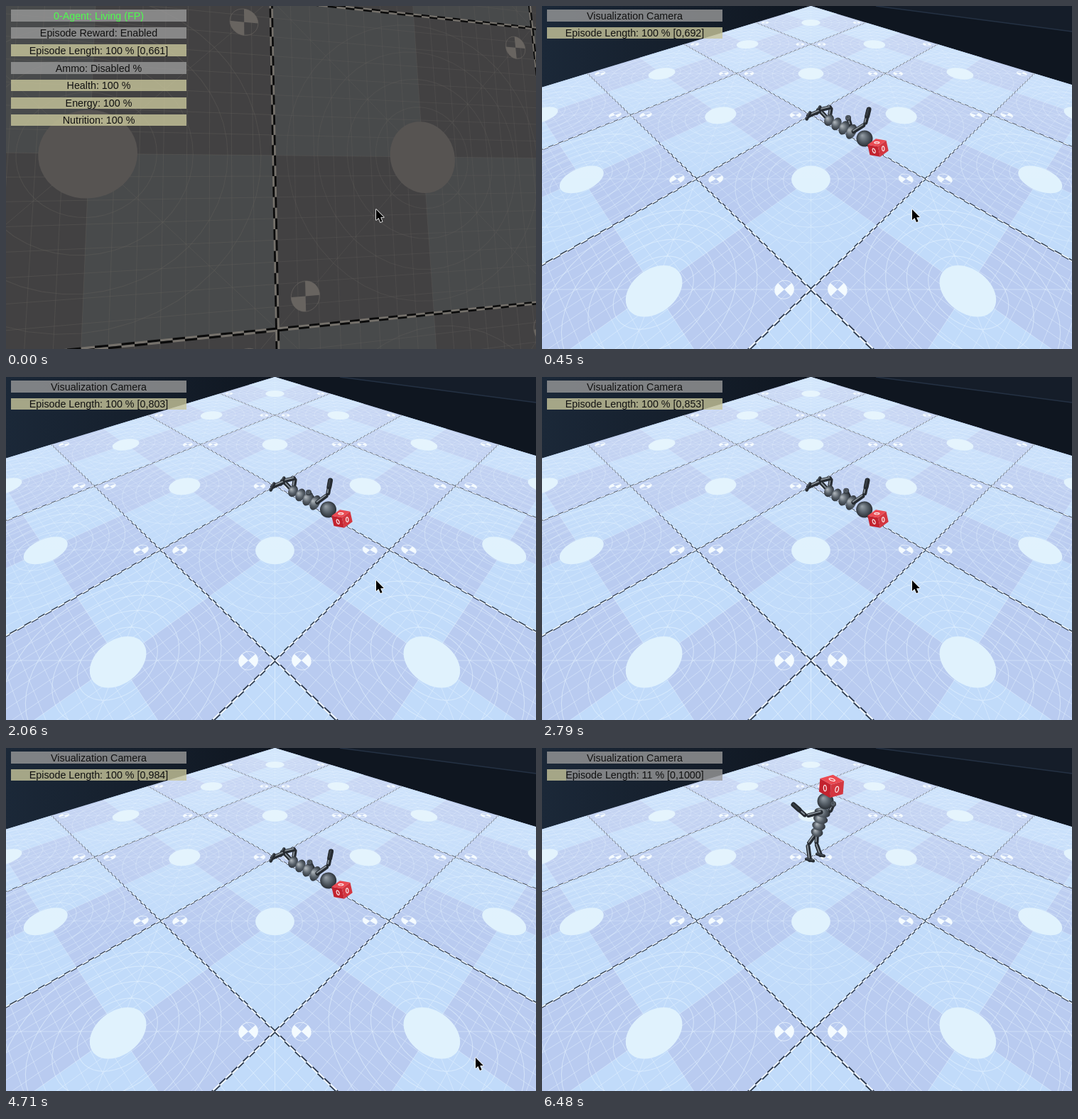
Recreate the animation shown at these times as an HTML page with a canvas. Size 746x484 px, loop 6580 ms.

```html
<!DOCTYPE html>
<html lang="en">
<head>
<meta charset="utf-8">
<title>Floor camera</title>
<style>
html, body { margin: 0; width: 100%; height: 100%; overflow: hidden; background: #0e131b; }
canvas { display: block; }
</style>
</head>
<body>
<canvas id="stage" width="746" height="484"></canvas>
<script>
const W = 746, H = 484, LOOP = 6580, STEP = 147.1;
const CUT = 3, CURSOR_GO = 28, RESET = 34;
const stage = document.getElementById('stage').getContext('2d');

const lerp = (a, b, k) => a + (b - a) * k;
const add = (p, d, k = 1) => [p[0] + d[0] * k, p[1] + d[1] * k];
const sub = (p, q) => [p[0] - q[0], p[1] - q[1]];
const mix = (p, q, k) => add(p, sub(q, p), k);
const perp = d => [-d[1], d[0]];

// Floor cameras: tile coordinates (u, v) to [x, y, depth]
function wideCam(u, v) {
  const s = u + v, w = 1 + 0.366 * s;
  return [378.5 + 220 * (v - u) / w, (400 - 66.7 * s) / w, w];
}
function agentCam(u, v) {
  const w = 1 + 0.202 * u - 0.103 * v;
  return [(373 + 517 * u - 30.4 * v) / w, (-9.5 + 47 * u + 419 * v) / w, w];
}

const wideLook = {
  light: '#c1dbfa', dark: '#b9cbf0', line: '#e6f4ff', fine: 0.45, ring: 0.55,
  emblem: '#e0f2fd', mark: '#f4fbff', seam: '#2b3646', check: '#f4faff', seamW: 1.5
};
const agentLook = {
  light: '#484a4b', dark: '#424142', line: '#67635f', fine: 0.3, ring: 0.3,
  emblem: '#575452', mark: '#686460', seam: '#0b0b0b', check: '#75716b', seamW: 2.6
};

function layer(draw) {
  const c = document.createElement('canvas');
  c.width = W;
  c.height = H;
  draw(c.getContext('2d'));
  return c;
}

function trace(g, pts, close = true) {
  g.beginPath();
  pts.forEach(p => g.lineTo(p[0], p[1]));
  if (close) g.closePath();
}

function fillPoly(g, pts, color) {
  g.fillStyle = color;
  trace(g, pts);
  g.fill();
}

function stroke(g, pts, color, width, alpha = 1) {
  g.globalAlpha = alpha;
  g.strokeStyle = color;
  g.lineWidth = width;
  trace(g, pts, false);
  g.stroke();
  g.globalAlpha = 1;
}

function fade(g, x, y, from, to) {
  const grad = g.createLinearGradient(0, 0, x, y);
  grad.addColorStop(0, from);
  grad.addColorStop(1, to);
  return grad;
}

function arcPoints(cam, u, v, r, from = 0, to = 2 * Math.PI) {
  return Array.from({ length: 49 }, (_, k) => {
    const a = lerp(from, to, k / 48);
    return cam(u + r * Math.cos(a), v + r * Math.sin(a));
  });
}

function drawTile(g, cam, look, i, j) {
  const rect = (u, v, s) => [cam(u, v), cam(u + s, v), cam(u + s, v + s), cam(u, v + s)];
  const depth = Math.max(0.7, cam(i + 0.5, j + 0.5)[2]);
  fillPoly(g, rect(i, j, 1), look.dark);
  fillPoly(g, rect(i, j, 0.5), look.light);
  fillPoly(g, rect(i + 0.5, j + 0.5, 0.5), look.light);

  const fine = look.fine / depth;
  for (let t = 1 / 16; t < 1; t += 1 / 16) {
    stroke(g, [cam(i + t, j), cam(i + t, j + 1)], look.line, 1, fine);
    stroke(g, [cam(i, j + t), cam(i + 1, j + t)], look.line, 1, fine);
  }
  stroke(g, [cam(i, j), cam(i + 1, j + 1)], look.line, 1, fine);
  stroke(g, [cam(i + 1, j), cam(i, j + 1)], look.line, 1, fine);
  for (let r = 0.17; r < 0.5; r += 0.097)
    stroke(g, arcPoints(cam, i + 0.5, j + 0.5, r), look.line, 1.1, look.ring / depth);
  fillPoly(g, arcPoints(cam, i + 0.5, j + 0.5, 0.12), look.emblem);
}

function drawMarker(g, cam, look, u, v) {
  for (const a of [Math.PI / 2, Math.PI * 1.5])
    fillPoly(g, [cam(u, v), ...arcPoints(cam, u, v, 0.043, a, a + Math.PI / 2)], look.mark);
  stroke(g, arcPoints(cam, u, v, 0.043), look.mark, 1, 0.7);
}

// Two rows of alternating checks along a tile edge
function drawSeam(g, cam, look, u, v, du, dv) {
  for (let k = 0; k < 32; k++)
    for (const side of [-1, 1]) {
      const at = t => cam(u + du * t / 32 + dv * side * 0.003, v + dv * t / 32 + du * side * 0.003);
      const p = at(k), color = (k % 2 ? side : -side) > 0 ? look.check : look.seam;
      stroke(g, [p, at(k + 1)], color, look.seamW / Math.max(0.7, p[2]));
    }
}

function drawFloor(g, cam, look, from, to, keep = () => true) {
  const cells = [];
  for (let i = from; i <= to; i++)
    for (let j = from; j <= to; j++)
      if (keep(i, j)) cells.push([i, j]);
  for (const [i, j] of cells) drawTile(g, cam, look, i, j);
  for (const [i, j] of cells) {
    drawSeam(g, cam, look, i, j, 1, 0);
    drawSeam(g, cam, look, i, j, 0, 1);
    drawMarker(g, cam, look, i + 0.085, j + 0.915);
    drawMarker(g, cam, look, i + 0.915, j + 0.085);
  }
}

const wideView = layer(g => {
  g.fillStyle = fade(g, 378, 0, '#1b2838', '#0f1620');
  g.fillRect(0, 0, W, H);
  fillPoly(g, [[470, 0], [W, 0], [W, 36]], '#151d29');
  stroke(g, [[470, 0], [W, 36]], '#243143', 1.5);
  drawFloor(g, wideCam, wideLook, -7, 2, (i, j) => i + j >= -2);
  const sheen = fade(g, 0, 260, 'rgba(255,255,255,.25)', 'rgba(255,255,255,0)');
  fillPoly(g, [wideCam(3, 3), wideCam(3, -3), wideCam(-3, 3)], sheen);
});
const agentView = layer(g => drawFloor(g, agentCam, agentLook, -1, 1));

function limb(a, b, width = 6, tone = '#8a939b') {
  stage.lineCap = 'round';
  stroke(stage, [a, b], '#262b31', width);
  stroke(stage, [add(a, [-0.8, -1]), add(b, [-0.8, -1])], tone, width * 0.3);
  stage.lineCap = 'butt';
}

function ball([x, y], rx, ry = rx, turn = 0, tone = '#b4bbc1') {
  const shade = stage.createRadialGradient(x - rx * 0.3, y - ry * 0.4, 0, x, y, rx * 1.1);
  shade.addColorStop(0, tone);
  shade.addColorStop(0.5, '#59626b');
  shade.addColorStop(1, '#22272d');
  stage.fillStyle = shade;
  stage.beginPath();
  stage.ellipse(x, y, rx, ry, turn, 0, 2 * Math.PI);
  stage.fill();
}

// Two bones from root to end; bend pushes the joint sideways. Returns the last bone's start.
function bentLimb(root, end, bend) {
  const joint = add(mix(root, end, 0.5), perp(sub(end, root)), bend);
  limb(mix(root, joint, 0.1), mix(root, joint, 0.85));
  limb(mix(joint, end, 0.1), end);
  return joint;
}

function drawRobot(pose) {
  const { head, hips, hands, feet, armBend, legBend } = pose;
  const axis = sub(head, hips), across = perp(axis);
  const turn = Math.atan2(axis[1], axis[0]) + Math.PI / 2;
  const size = Math.hypot(axis[0], axis[1]);
  const shoulder = mix(hips, head, 0.66);

  bentLimb(shoulder, hands[1], armBend[1]);
  feet.forEach((foot, n) => {
    bentLimb(hips, foot, legBend[n]);
    limb(add(foot, across, -5 / size), add(foot, across, 5 / size), 4.5, '#4a525a');
  });
  for (let k = 0; k < 4; k++)
    ball(mix(hips, head, k * 0.21), 8.5 + k * 0.9, 6.5, turn);
  const elbow = bentLimb(shoulder, hands[0], armBend[0]);
  limb(mix(elbow, hands[0], 0.55), hands[0], 7, '#3a4148');
  ball(head, 11.5, 11.5, turn, '#98a1a9');
  ball(hands[1], 4, 4, 0, '#3a4148');
}

function lyingPose(sway) {
  const move = (x, y, dx, dy) => [x + dx * sway, y + dy * sway];
  return {
    head: move(454, 187, -0.5, 0), hips: [404, 161],
    hands: [move(460, 146, -3.5, 0), move(431, 158, -5, 5)],
    feet: [[389, 147], [375, 155]],
    armBend: [0.2, 0], legBend: [0.75, 0.35]
  };
}

// drop runs from the first drop in the air to landing with bent knees
function standingPose(drop) {
  const upper = (x, y) => [x + 8 * drop, y + 23 * drop];
  const lower = (x, y) => [x + 6 * drop, y + 14 * drop];
  return {
    head: upper(391, 52), hips: lower(381, 105),
    hands: [upper(346, 57), upper(402, 56)],
    feet: [lower(371, 144), lower(386, 137)],
    armBend: [-0.27, 0.3], legBend: [0.2, 0.1]
  };
}

function drawCube(center, size, yaw, roll) {
  const tip = (x, y) => [x * Math.cos(roll) - y * Math.sin(roll), x * Math.sin(roll) + y * Math.cos(roll)];
  const a = tip(size * Math.cos(yaw), -size * Math.sin(yaw) * 0.42);
  const b = tip(-size * Math.sin(yaw), -size * Math.cos(yaw) * 0.42);
  const c = tip(0, size * 0.78);
  const front = [a, b, c].reduce((p, d) => add(p, d, -0.5), center);
  const face = (p, q, color) => {
    const at = (s, t) => add(add(front, p, s), q, t);
    fillPoly(stage, [at(0, 0), at(1, 0), at(1, 1), at(0, 1)], color);
    const ring = Array.from({ length: 17 }, (_, k) =>
      at(0.5 + 0.13 * Math.cos(k * Math.PI / 8), 0.5 + 0.22 * Math.sin(k * Math.PI / 8)));
    stroke(stage, ring, '#fff', 1.2, 0.9);
  };
  face(b, c, '#c3222e');
  face(a, c, '#d33640');
  face(a, b, '#ea4a52');
}

function bar(row, label, fill = 0, color = '#111') {
  const top = Math.round(5 + 24.7 * row), bottom = Math.round(21.6 + 24.65 * row);
  const full = 247 * fill;
  stage.fillStyle = 'rgba(200,198,155,.8)';
  stage.fillRect(7, top, full, bottom - top);
  stage.fillStyle = 'rgba(153,153,153,.8)';
  stage.fillRect(7 + full, top, 247 - full, bottom - top);
  stage.fillStyle = color;
  stage.font = '14.3px "Liberation Sans", Arial, sans-serif';
  stage.textAlign = 'center';
  stage.fillText(label, 130.5, Math.round((top + bottom) / 2 + 5));
}

function drawCursor(step) {
  if (step >= RESET) return;
  const moved = Math.max(0, step - CURSOR_GO);
  const tip = [521 + 35 * moved, 287 + 37.5 * moved];
  const shape = [[0, 0], [0, 15], [3.5, 12], [6, 18], [8.6, 17], [6.2, 11.2], [10.8, 11]];
  const pts = shape.map(p => add(tip, p));
  stage.lineJoin = 'round';
  trace(stage, pts);
  stage.strokeStyle = '#fff';
  stage.lineWidth = 1.6;
  stage.stroke();
  fillPoly(stage, pts, '#000');
}

function drawScene(step) {
  const count = 661.9 + 10.08 * step;
  const restarted = step >= RESET;
  const percent = restarted ? Math.ceil((count - 1000) / 10) : 100;
  const lengthText = `Episode Length: ${percent} % [0,${Math.min(1000, Math.floor(count))}]`;

  if (step < CUT) {
    stage.drawImage(agentView, 0, 0);
    bar(0, '0-Agent; Living (FP)', 0, '#4dff4d');
    bar(1, 'Episode Reward: Enabled');
    bar(2, lengthText, 1);
    bar(3, 'Ammo: Disabled %');
    ['Health', 'Energy', 'Nutrition'].forEach((name, n) => bar(4 + n, name + ': 100 %', 1));
  } else {
    stage.drawImage(wideView, 0, 0);
    if (restarted) {
      // Falls with constant acceleration until it lands
      const drop = Math.min(1, 0.039 * ((step - RESET) ** 2 - 16));
      drawRobot(standingPose(drop));
      drawCube([397 + 10.5 * drop, 26.5 + 27.5 * drop], 24, 0.85 - 0.12 * drop, 0.08 * drop);
    } else {
      const sway = 0.5 - 0.5 * Math.cos(2 * Math.PI * (step - CUT) / 22);
      drawRobot(lyingPose(sway));
      drawCube([473, 200], 19, 0.8, -0.22);
    }
    bar(0, 'Visualization Camera');
    bar(1, lengthText, percent / 100);
  }
  drawCursor(step);
}

let shown = -1;
function tick() {
  const step = Math.min(44, Math.floor((performance.now() % LOOP + 9) / STEP));
  if (step !== shown) drawScene(shown = step);
  requestAnimationFrame(tick);
}
tick();
</script>
</body>
</html>
```
